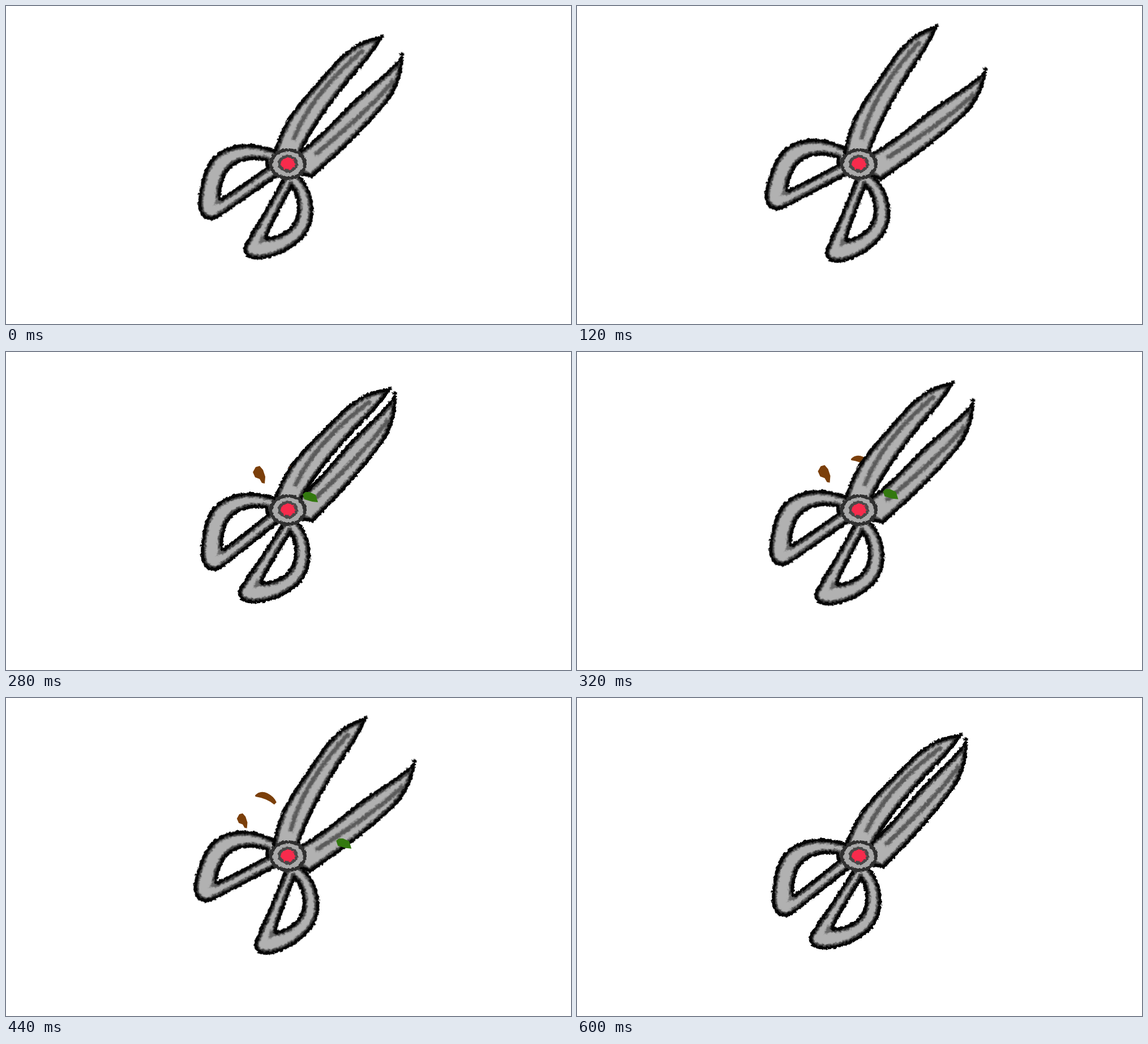
These frames come from a looping animation (998x561 px, 0.88 s). An HTML page:

```html
<!DOCTYPE html>
<html lang="en">
<head>
<meta charset="utf-8">
<title>Scissors</title>
<style>
  html, body { margin: 0; width: 100%; height: 100%; overflow: hidden; background: #fff; }
  svg { display: block; width: 100%; height: 100%; }
</style>
</head>
<body>
<svg id="stage" viewBox="0 0 998 561"></svg>
<script>
const STEP = 40, LOOP = 880, LAST = 600;
const CUT = 320, CLOSED = 280, OPEN_ANGLE = 10.7, EASE = 1.45;

// All outlines show the closed scissors; each half turns about the rivet.
const halves = [
  {
    id: 'right', turn: 1,
    blade: 'M687 78C688 110 679 138 662 162C632 203 585 254 541 298L505 290L512 262L530 247C550 230 578 196 607 163C637 131 667 107 687 78Z',
    handle: 'M485 262C440 244 405 248 377 267C353 286 346 325 347 360C348 379 362 387 376 382C405 362 440 330 485 297Z',
    hole: 'M460 274C425 269 393 281 385 312C380 330 379 344 383 349C391 344 430 315 462 288Z',
    groove: 'M676 118Q638 172 544 260',
    corner: 'M371 360L378 346L390 351Z',
    tip: 'M682 74l9-1M688 69l-3 11'
  },
  {
    id: 'left', turn: -1,
    blade: 'M676 67C650 68 624 80 600 101C570 130 530 168 508 196C496 214 484 234 477 255L490 275L515 270L527 248C550 210 588 165 619 132C643 108 660 92 676 67Z',
    handle: 'M494 296C470 335 445 372 414 417C408 433 420 441 438 441C480 439 520 415 531 385C541 350 534 320 508 292Z',
    hole: 'M502 318C514 335 515 360 505 381C494 399 470 409 451 407C456 392 481 350 502 318Z',
    groove: 'M644 86Q545 160 510 238',
    corner: 'M436 417L443 400L452 412Z',
    tip: 'M671 66l11-1M678 61l-3 11'
  }
];

// Each chip flies from (x, y) with speed (vx, vy) and acceleration (ax, ay), per 80 ms.
const chips = [
  { id: 'curl', color: '#7b3f0a', behind: true, x: 518, y: 208, vx: -31, vy: -35, ax: .7, ay: 9.5, life: 3.7,
    path: 'M-19-4Q-10-14 3-8Q15-2 19 8L15 12Q2 1-18-2Z' },
  { id: 'flake', color: '#7b3f0a', x: 448, y: 217, vx: -23, vy: -4, ax: 4, ay: 2, life: 3,
    path: 'M-12-5L-7-14L0-16L6-9L10 3L9 15L4 14L0 7L-8 4Z' },
  { id: 'leaf', color: '#33790f', x: 538, y: 256, vx: 34, vy: -14, ax: -2.2, ay: 7.2, life: 3.8,
    path: 'M-14-5L-9-9L-2-9L9-4L13 9L3 8L-11 4Z' }
];

const chipMarkup = c => `<path id="${c.id}" d="${c.path}" fill="${c.color}"/>`;

function halfMarkup({ id, blade, handle, hole, groove, corner, tip }) {
  const shape = blade + handle + hole;
  return `<clipPath id="${id}Clip"><path d="${shape}" clip-rule="evenodd"/></clipPath>
    <g id="${id}"><g filter="url(#rough)">
      <path d="${shape}" fill="#b1b1b1" fill-rule="evenodd"/>
      <g clip-path="url(#${id}Clip)" fill="none">
        <path d="${shape}" stroke="#383838" stroke-width="12" filter="url(#soft)"/>
        <path d="${groove}" stroke="#4c4c4c" stroke-width="8" opacity=".85" filter="url(#soft)"/>
        <path d="${corner}" fill="#686868" filter="url(#soft)"/>
      </g>
      <path d="${shape}" fill="none" stroke="#050505" stroke-width="5.5" stroke-linejoin="round"/>
      <path d="${tip}" stroke="#050505" stroke-width="3.5"/>
    </g></g>`;
}

const area = 'filterUnits="userSpaceOnUse" x="300" y="20" width="440" height="450" color-interpolation-filters="sRGB"';

stage.innerHTML = `
  <defs>
    <filter id="rough" ${area}>
      <feTurbulence type="fractalNoise" baseFrequency=".22" numOctaves="2" seed="4"/>
      <feDisplacementMap in="SourceGraphic" scale="6" xChannelSelector="R" yChannelSelector="G"/>
    </filter>
    <filter id="soft" ${area}><feGaussianBlur stdDeviation="1.3"/></filter>
  </defs>
  ${chips.filter(c => c.behind).map(chipMarkup).join('')}
  ${halves.map(halfMarkup).join('')}
  <g filter="url(#rough)">
    <ellipse cx="498" cy="279" rx="30" ry="25" fill="#a9a9a9" stroke="#303030" stroke-width="6"/>
    <ellipse cx="498" cy="278" rx="18" ry="15.5" fill="#494949"/>
    <ellipse cx="498" cy="278" rx="12.5" ry="10.5" fill="#f72b4c"/>
  </g>
  ${chips.filter(c => !c.behind).map(chipMarkup).join('')}`;

const place = (id, transform) => document.getElementById(id).setAttribute('transform', transform);

// Opens fast and settles, then closes fast and settles.
function opening(t) {
  const u = (t - CLOSED + CUT) % CUT / (CUT / 2);
  return OPEN_ANGLE * (u < 1 ? 1 - (1 - u) ** EASE : (2 - u) ** EASE);
}

function draw(now) {
  const t = Math.min(LAST, Math.floor(now % LOOP / STEP) * STEP);
  for (const { id, turn } of halves) place(id, `rotate(${turn * opening(t)} 498 278)`);

  const s = (t - CLOSED) / 80;
  for (const { id, x, y, vx, vy, ax, ay, life } of chips) {
    const size = s < -.5 ? 0 : Math.max(0, Math.min(1, (life - s) * .85));
    place(id, `translate(${x + vx * s + ax * s * s} ${y + vy * s + ay * s * s}) scale(${size})`);
  }
}

const start = performance.now();
function tick() {
  draw(performance.now() - start);
  requestAnimationFrame(tick);
}
tick();
</script>
</body>
</html>
```
